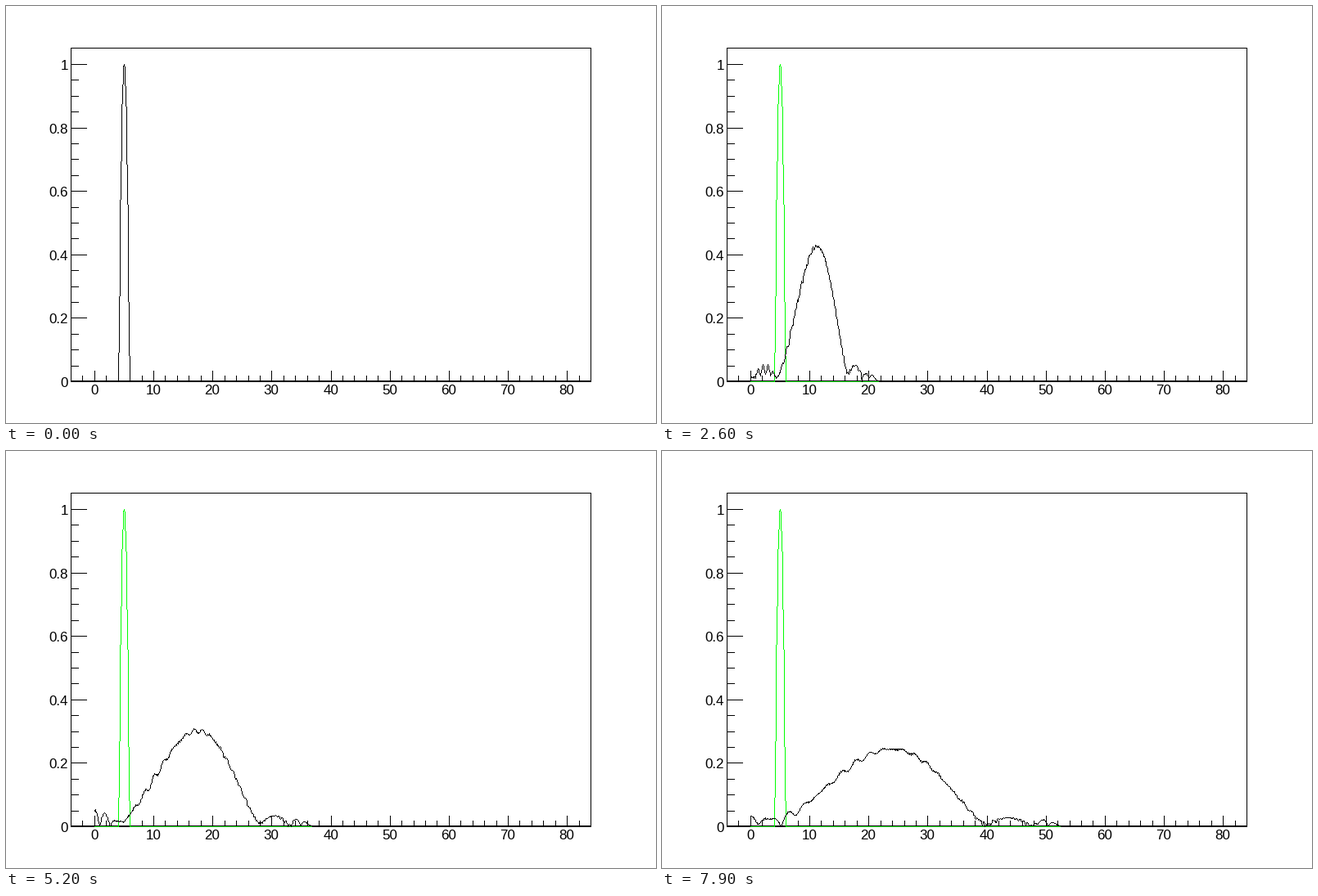
Recreate the animation shown at these times as a matplotlib script. Size 794x510 px, loop 8 s.

```python
import matplotlib.pyplot as plt
import numpy as np
from matplotlib.animation import FuncAnimation

W, H, DPI = 794, 510, 64
PX = 72 / DPI  # one pixel in points
FRAMES, INTERVAL = 80, 100
BLACK, GREEN = (0, 0, 0), (0, 255, 0)
LEFT, RIGHT, TOP, BOTTOM = 79, 714, 51, 459

plt.rcParams["font.family"] = "Liberation Sans"

# Wave packet on a lattice with a reflecting wall at x = 0
STEP = 0.091
X = np.arange(880) * STEP
CENTER, HALF, K0 = 5.0, 0.9, 4.55
DIFFUSION = 0.527  # hbar / m per second of animation

shape = np.clip(1 - ((X - CENTER) / HALF) ** 2, 0, None)
shape /= shape.max()
start = shape * np.exp(1j * K0 * X)
spectrum = np.fft.fft(np.concatenate([start, start[-2:0:-1]]))
theta = 2 * np.pi * np.fft.fftfreq(len(spectrum))
energy = DIFFUSION / STEP**2 * (1 - np.cos(theta))


def amplitude(t):
    psi = np.fft.ifft(spectrum * np.exp(-1j * energy * t))
    return np.abs(psi[:len(X)])


# Plot coordinates to pixel indices
def px(x):
    return np.floor(108.4 + 7.216 * np.asarray(x)).astype(int)


def py(y):
    return np.floor(459.6 - 388.2 * np.asarray(y)).astype(int)


def stroke(image, xs, ys, color=BLACK):
    """Draw a crisp one-pixel polyline through integer points."""
    for x0, y0, x1, y1 in zip(xs[:-1], ys[:-1], xs[1:], ys[1:]):
        n = max(abs(x1 - x0), abs(y1 - y0)) + 1
        cols = np.rint(np.linspace(x0, x1, n)).astype(int)
        rows = np.rint(np.linspace(y0, y1, n)).astype(int)
        image[np.maximum(rows, TOP), cols] = color


fig = plt.figure(figsize=(W / DPI, H / DPI), dpi=DPI, facecolor="white")
ax = fig.add_axes([0, 0, 1, 1])
ax.axis("off")


def label(x, y, text, align):
    ax.text(x, y, text, fontsize=17 * PX, ha=align, va="baseline")


base = np.full((H, W, 3), 255, dtype=np.uint8)
stroke(base, [LEFT, RIGHT, RIGHT, LEFT, LEFT],
       [TOP, TOP, BOTTOM, BOTTOM, TOP])
stroke(base, [LEFT, RIGHT], [BOTTOM - 1, BOTTOM - 1])

for i in range(22):
    y = int(py(i * 0.05))
    stroke(base, [LEFT, LEFT + (19 if i % 4 == 0 else 9)], [y, y])
    if i % 4 == 0:
        label(75.8, y + 7, f"{i * 0.05:.1g}", "right")

for v in range(-4, 85, 2):
    x = int(px(v))
    stroke(base, [x, x], [BOTTOM, BOTTOM - (13 if v % 10 == 0 else 7)])
    if v % 10 == 0:
        label(x, 475, str(v), "center")

inside = X <= 80
cols = px(X[inside])
stroke(base, cols, py(shape[inside]), GREEN)
picture = ax.imshow(base, extent=(0, W, H, 0), aspect="auto",
                    interpolation="nearest", zorder=0)
ax.set_xlim(0, W)
ax.set_ylim(H, 0)


def update(frame):
    image = base.copy()
    wave = amplitude(frame * INTERVAL / 1000)
    stroke(image, cols, py(wave[inside]))
    picture.set_data(image)
    return [picture]


anim = FuncAnimation(fig, update, frames=FRAMES, interval=INTERVAL,
                     repeat=True, repeat_delay=0)
plt.show()
```
